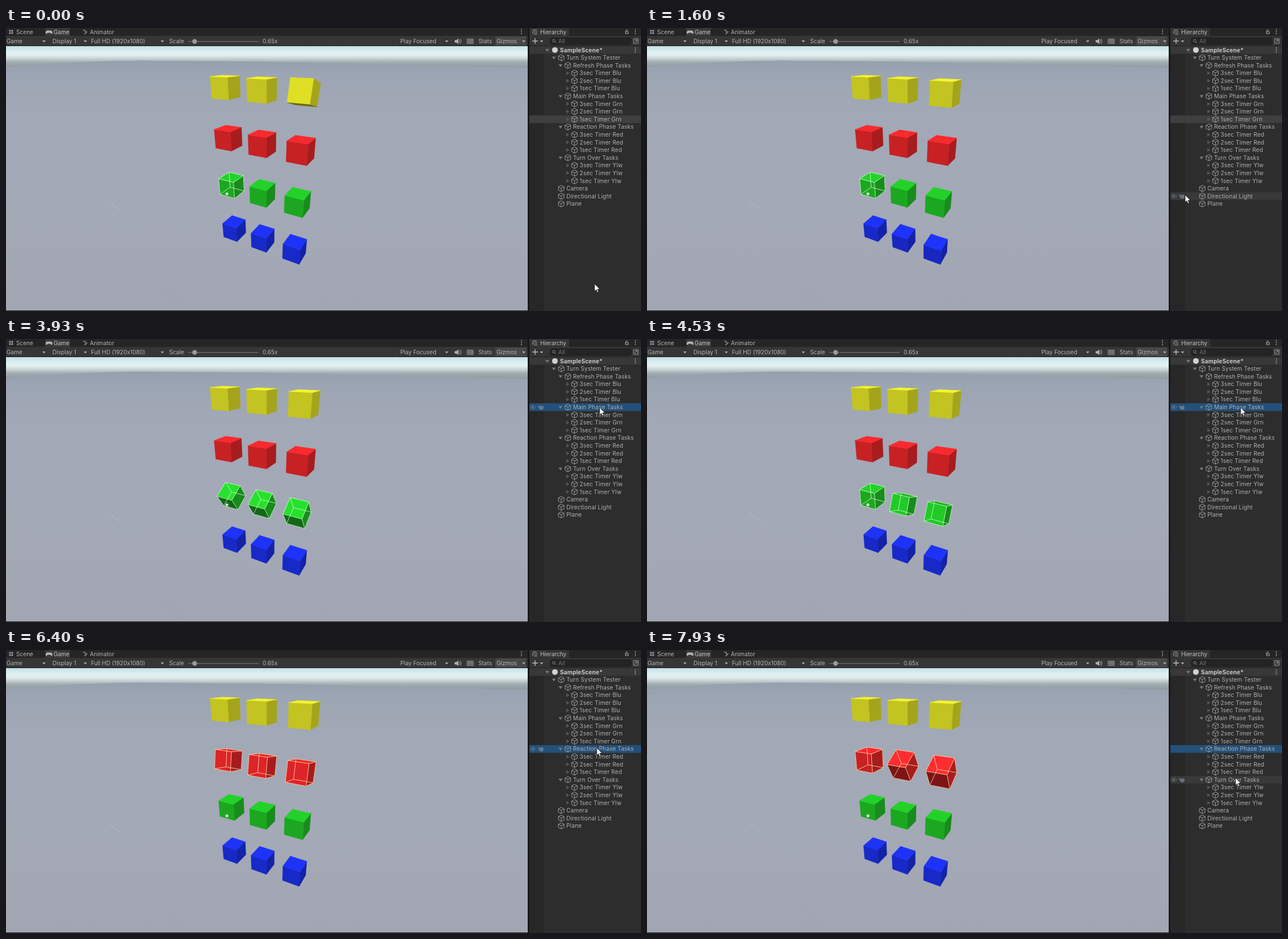
An HTML page for the animation above (8 s loop, 1121x500 px).

```html
<!DOCTYPE html>
<html lang="en">
<head>
<meta charset="utf-8">
<title>Turn system</title>
<style>
  html, body { margin: 0; width: 100%; height: 100%; overflow: hidden; background: #2d2d2d; }
  svg { display: block; font: 10.1px Inter, sans-serif; }
  .tree { letter-spacing: .16px; }
</style>
</head>
<body>
<svg id="stage" width="1121" height="500" viewBox="0 0 1121 500" xmlns="http://www.w3.org/2000/svg"></svg>
<script>
const LOOP = 8000;
const stage = document.getElementById('stage');

// ---- markup helpers ----
const rect = (x, y, w, h, fill, more = '') =>
  `<rect x="${x}" y="${y}" width="${w}" height="${h}" fill="${fill}" ${more}/>`;
const text = (x, y, s, fill = '#b4b4b4', more = '') =>
  `<text x="${x}" y="${y}" fill="${fill}" ${more}>${s}</text>`;
const line = (d, stroke = '#b4b4b4', w = 1, more = '') =>
  `<path d="${d}" fill="none" stroke="${stroke}" stroke-width="${w}" ${more}/>`;
const shape = (d, fill = '#b4b4b4', more = '') => `<path d="${d}" fill="${fill}" ${more}/>`;
const caret = (x, y = 22) => shape(`M${x - 3} ${y}h6l-3 3.5z`, '#a8a8a8');
const dots = (x, y) => [-3.5, 0, 3.5].map(d => rect(x - .8, y + d - .8, 1.6, 1.6, '#b4b4b4')).join('');
const box = (x, y) => line(
  `M${x} ${y - 5.5}l5 2.6v5.8l-5 2.6l-5 -2.6v-5.8zM${x - 5} ${y - 2.9}l5 2.6l5 -2.6M${x} ${y - .3}v5.8`,
  '#a2a2a2', .95, 'stroke-linejoin="round"');

// ---- scene backdrop ----
function backdrop() {
  return `<defs>
    <linearGradient id="sky" x1="0" y1="32" x2="0" y2="70" gradientUnits="userSpaceOnUse">
      <stop offset="0" stop-color="#c3dfe5"/><stop offset=".25" stop-color="#dceff2"/>
      <stop offset=".42" stop-color="#e2efee"/><stop offset=".58" stop-color="#c6d2d4"/>
      <stop offset=".75" stop-color="#a2acb1"/><stop offset="1" stop-color="#8f999f"/></linearGradient>
    <linearGradient id="ground" x1="0" y1="56" x2="0" y2="498" gradientUnits="userSpaceOnUse">
      <stop offset="0" stop-color="#959fad"/><stop offset=".06" stop-color="#9ca5b3"/>
      <stop offset=".2" stop-color="#a1a8b6"/><stop offset=".6" stop-color="#a4a9b6"/>
      <stop offset="1" stop-color="#a2a6b3"/></linearGradient>
    <clipPath id="view"><rect x="0" y="32" width="921" height="467"/></clipPath>
  </defs>` +
  rect(0, 32, 921, 40, 'url(#sky)') +
  shape('M0 69Q110 59 240 57.500L460 59.500L921 70V499H0z', 'url(#ground)') +
  line('M182 307L204 325', '#d3d8e2', .8, 'opacity=".6" stroke-dasharray="5 2"') +
  line('M218 402L318 498', '#7f86a6', .7, 'opacity=".45"');
}

// ---- editor chrome ----
function gameBars() {
  return rect(0, 0, 922, 14, '#252525') + rect(69, 0, 44, 14, '#383838') +
    rect(0, 14, 922, 18, '#363636') + rect(0, 31, 922, 1, '#1d1d1d') +
    rect(0, 499, 922, 1, '#1b1b1b') +
    line('M7 3v8M11 3v8M5 5h8M5 9h8') + text(18, 10.6, 'Scene') +
    shape('M72 4.5h8q2 1 2 5q-2 2 -3.5 -1h-5q-1.5 3 -3.5 1q0 -4 2 -5z') + text(84, 10.6, 'Game', '#c6c6c6') +
    line('M136 4h4v3h4M138 10h3v-3') + text(148, 10.6, 'Animator') + dots(910, 6.5) +
    text(1, 27, 'Game') + caret(67) + text(82, 27, 'Display 1') + caret(140) +
    text(150, 27, 'Full HD (1920x1080)') + caret(276) + text(288, 27, 'Scale') +
    rect(322, 23, 124, 1.6, '#646464') + '<circle cx="333" cy="23.8" r="4.2" fill="#999"/>' +
    text(453, 27, '0.65x') + text(696, 27, 'Play Focused') + caret(778) +
    shape('M792 21.5h3l3.5 -3v10l-3.5 -3h-3z') + line('M800 20.5q2 3 0 6M801.8 19q3.2 4.500 0 9', '#b4b4b4', .9) +
    line('M814 19.500h11v8h-11zM814 22h11M814 24.700h11M817 19.500v8M819.700 19.500v8M822.400 19.500v8', '#a8a8a8', .8) +
    text(834, 27, 'Stats') + rect(864, 15, 54, 16, '#484848') + text(866, 27, 'Gizmos') + caret(914);
}

const ROW_H = 13.59;
const rowY = i => 38.9 + i * ROW_H;
const groups = [['Refresh', 'Blu'], ['Main', 'Grn'], ['Reaction', 'Red'], ['Turn Over', 'Ylw']];
const rows = [['SampleScene*', 0], ['Turn System Tester', 1]];
for (const [phase, hue] of groups) {
  rows.push([phase + (phase === 'Turn Over' ? ' Tasks' : ' Phase Tasks'), 2]);
  for (const n of [3, 2, 1]) rows.push([`${n}sec Timer ${hue}`, 3]);
}
for (const name of ['Camera', 'Directional Light', 'Plane']) rows.push([name, 1, true]);

function panelBase() {
  return rect(921, 0, 200, 500, '#191919') + rect(924, 0, 197, 14, '#252525') +
    rect(924, 0, 70, 14, '#343434') + rect(924, 14, 197, 18, '#343434') + rect(924, 31, 197, 1, '#202020') +
    rect(924, 32, 197, 468, '#2d2d2d') + rect(924, 32, 26, 468, '#272727') +
    rect(924, 32, 197, 13.6, '#383838') +
    line('M930 3.500h7M932 7h6M932 10.500h6M930 5v5') + text(943, 10.6, 'Hierarchy', '#c0c0c0') +
    line('M1094 6v-1.500q2 -3 4 0M1093.500 6.500h5v3.500h-5z') + dots(1111, 6.5) +
    line('M934 18v10M929 23h10', '#bdbdbd', 1.4) + caret(945.5) +
    rect(961, 17.5, 143, 11.5, '#242424', 'rx="3" stroke="#1b1b1b"') +
    '<circle cx="967" cy="22.500" r="2.300" fill="none" stroke="#8a8a8a"/>' + line('M969 24.500l2 2', '#8a8a8a') +
    text(975, 27, 'All', '#707070') +
    line('M1108 19h8v8h-8zM1110 25l4 -4M1111 21h3v3', '#a8a8a8', .9);
}

function tree() {
  return rows.map(([name, depth, leaf], i) => {
    const y = rowY(i), x = 969 + depth * 11.7;
    if (!depth) return shape(`M952 ${y - 2}h7l-3.500 5z`, '#777') +
      `<circle cx="969" cy="${y}" r="5" fill="#d2d2d2"/>` +
      text(978, y + 3.6, name, '#c8c8c8', 'font-weight="700"') + dots(1111, y);
    const fold = leaf ? '' : depth === 3
      ? shape(`M${x - 15} ${y - 3.5}v7l5.500 -3.500z`, '#555')
      : shape(`M${x - 17} ${y - 2}h7l-3.500 5z`, '#777');
    return fold + box(x - .5, y) + text(x + 8.500, y + 3.6, name, '#b0b0b0');
  }).join('');
}

const rowTools = shape('M924.500 0q5.500 -6.500 11 0q-5.500 6.500 -11 0z', 'none', 'stroke="#8b949c" stroke-width=".9"') +
  '<circle cx="930" r="1.900" fill="#8b949c"/>' +
  shape('M939 -4l3 2.500l4 -1.500l3 2v3l-2 2.500h-4l-2.500 -3z', '#8b949c');

stage.innerHTML = backdrop() + '<g id="cubes" clip-path="url(#view)"></g>' +
  line('M386.500 293h7M390 289.500v7M387.600 290.600l4.800 4.800M392.400 290.600l-4.800 4.800', '#fff', .8, 'opacity=".85"') +
  '<circle cx="390" cy="293" r="1.700" fill="#fff"/>' +
  gameBars() + panelBase() +
  '<rect id="hover" x="924" width="197" height="13.600" fill="#393939"/>' +
  '<rect id="pick" x="924" width="197" height="13.600"/>' +
  `<g id="tools" opacity=".6">${rowTools}</g><g class="tree">${tree()}</g>` +
  '<path id="cursor" d="M0 0V13L3 10.300L5 15.200L7.200 14.200L5.200 9.600H9.300z" fill="#fff" stroke="#111" stroke-width=".8"/>';

// ---- cubes: a pitched perspective camera, cubes turning about their row's axis ----
const F = 465, CX = 461, CY = 265, PITCH = .447, YAW = .489, HALF = .247;
const [sp, cp, sy, cy] = [Math.sin(PITCH), Math.cos(PITCH), Math.sin(YAW), Math.cos(YAW)];
const AXIS = [cy, sy * sp, -sy * cp];
const BACK = [sy, -cy * sp, cy * cp];
const DOWN = [0, cp, sp];

// screen position of the middle cube, depth, base colour, first start (s), degrees per second
const lines = [
  { x: 452, y: 109, z: 5.91, rgb: [250, 250, 42], start: -2.72, rate: 270 },
  { x: 452.5, y: 204, z: 6.41, rgb: [255, 42, 46], start: 6.28, rate: 90, wire: '#fff0b4' },
  { x: 453, y: 291.5, z: 7.04, rgb: [36, 214, 42], start: 3.28, rate: 90, wire: '#e6ffe6' },
  { x: 453.5, y: 371, z: 7.7, rgb: [30, 52, 255], start: .28, rate: 270 }
];
const FACES = [[0, 1], [0, -1], [1, 1], [1, -1], [2, 1], [2, -1]];
const mix = (a, p, b, q) => a.map((v, i) => v * p + b[i] * q);
const add = (a, b, k) => a.map((v, i) => v + b[i] * k);
const project = p => [CX + F * p[0] / p[2], CY + F * p[1] / p[2]];
const toPath = pts => 'M' + pts.map(p => p.map(v => v.toFixed(2)).join(' ')).join('L');

const shade = (rgb, along, front, up) => {
  const lit = .5 + .08 * up + .5 * Math.max(0, .31 * along + .56 * front + .8 * up);
  return `rgb(${rgb.map(v => Math.min(255, Math.round(v * lit)))})`;
};

function cube(row, col, sec, wired) {
  const run = sec - row.start;
  const a = run > 0 && run < col + 1 ? run * row.rate * Math.PI / 180 : 0;
  const c = Math.cos(a), s = Math.sin(a);
  const axes = [AXIS, mix(BACK, c, DOWN, s), mix(DOWN, c, BACK, -s)];
  const mid = add([(row.x - CX) / F * row.z, (row.y - CY) / F * row.z, row.z], AXIS, col - 1);
  const corner = k => axes.reduce((p, v, i) => add(p, v, k[i] * HALF), mid);
  let out = '';
  for (const [n, sign] of FACES) {
    const normal = axes[n].map(v => v * sign);
    const centre = add(mid, normal, HALF);
    if (centre.reduce((d, v, i) => d + v * normal[i], 0) >= 0) continue;
    const pts = [[-1, -1], [1, -1], [1, 1], [-1, 1]].map(([p, q]) => {
      const k = [0, 0, 0];
      k[n] = sign; k[(n + 1) % 3] = p; k[(n + 2) % 3] = q;
      return project(corner(k));
    });
    const fill = n === 0 ? shade(row.rgb, sign, 0, 0)
      : n === 1 ? shade(row.rgb, 0, -sign * c, -sign * s)
      : shade(row.rgb, 0, sign * s, -sign * c);
    out += shape(toPath(pts) + 'z', fill, `stroke="${fill}" stroke-width=".5" stroke-linejoin="round"`);
  }
  if (wired) {
    let d = '';
    for (let n = 0; n < 3; n++) for (const p of [-1, 1]) for (const q of [-1, 1]) {
      const ends = [-1, 1].map(e => {
        const k = [0, 0, 0];
        k[n] = e; k[(n + 1) % 3] = p; k[(n + 2) % 3] = q;
        return project(corner(k));
      });
      d += toPath(ends);
    }
    out += line(d, row.wire, .85, 'opacity=".9"');
  }
  return out;
}

// ---- pointer and selection ----
const path = [
  [0, 1039, 452], [.15, 1039, 452], [.85, 1018, 395], [1.35, 956, 300], [1.6, 950, 295], [1.8, 950, 295],
  [2.35, 1048, 121], [4.55, 1048, 121], [5.15, 1044, 171], [5.3, 1044, 171], [5.6, 1043, 173],
  [7.15, 1043, 173], [7.7, 1039, 226], [8, 1039, 226]
];
function pointer(sec) {
  let i = 1;
  while (i < path.length - 1 && sec > path[i][0]) i++;
  const [t0, x0, y0] = path[i - 1], [t1, x1, y1] = path[i];
  const k = Math.min(1, (sec - t0) / (t1 - t0)), e = k * k * (3 - 2 * k);
  return [x0 + (x1 - x0) * e, y0 + (y1 - y0) * e];
}

const PICK_MAIN = 2.5, PICK_REACTION = 6.25;
const $ = id => document.getElementById(id);
const [cubes, hover, pick, tools, cursor] = ['cubes', 'hover', 'pick', 'tools', 'cursor'].map($);

function draw(ms) {
  const sec = ms / 1000;
  const isWired = (r, c) => sec < PICK_MAIN ? r === 2 && c === 0 : r === (sec < PICK_REACTION ? 2 : 1);
  cubes.innerHTML = lines.map((row, r) => [0, 1, 2].map(c => cube(row, c, sec, isWired(r, c))).join('')).join('');

  const [px, py] = pointer(sec);
  cursor.setAttribute('transform', `translate(${px.toFixed(2)} ${py.toFixed(2)})`);
  const over = Math.round((py - rowY(0)) / ROW_H);
  const show = over > 0 && over < rows.length ? 'inline' : 'none';
  hover.setAttribute('display', show);
  tools.setAttribute('display', show);
  hover.setAttribute('y', rowY(over) - 6.8);
  tools.setAttribute('transform', `translate(0 ${rowY(over)})`);

  const chosen = sec < PICK_MAIN ? 9 : sec < PICK_REACTION ? 6 : 10;
  pick.setAttribute('y', rowY(chosen) - 6.8);
  pick.setAttribute('fill', chosen === 9 ? '#3f3f3f' : '#24507a');
}

const began = performance.now();
function tick() {
  draw((performance.now() - began) % LOOP);
  requestAnimationFrame(tick);
}
draw(0);
requestAnimationFrame(tick);
</script>
</body>
</html>
```
